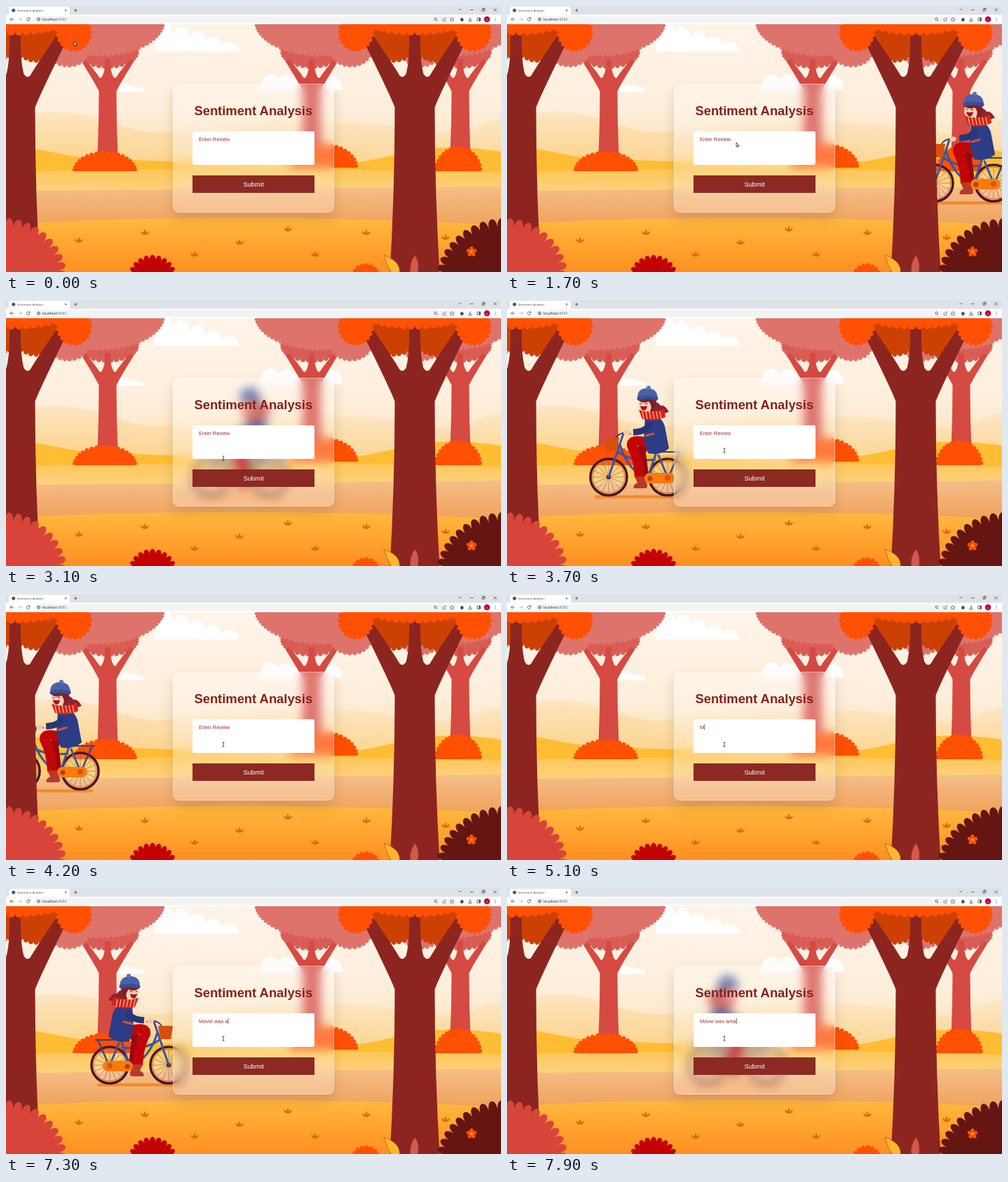
Recreate the animation shown at these times as an HTML page. Size 706 px wide and 380 px high, loop 8000 ms.

```html
<!DOCTYPE html>
<html lang="en">
<head>
<meta charset="utf-8">
<title>Sentiment Analysis</title>
<style>
html, body { margin: 0; width: 100%; height: 100%; overflow: hidden; background: #fff3e8; }
svg, .card { position: absolute; }
svg { left: 0; top: 0; width: 706px; height: 380px; display: block; }
text { font-family: "Liberation Sans", Arial, sans-serif; }
.ui { font-family: "Open Sans", "Noto Sans", sans-serif; }
.card {
  left: 238px; top: 111px; width: 230px; height: 184px; box-sizing: border-box;
  border: 1px solid rgba(255,255,255,.38); border-radius: 9px;
  background: rgba(255,255,255,.24);
  -webkit-backdrop-filter: blur(7px); backdrop-filter: blur(7px);
  box-shadow: 0 9px 18px rgba(125,70,20,.2);
}
#bike, #mouse, #button, #arrow, #hand, #beam { animation: 8s -20ms step-end infinite; }
#bike { animation-name: ride; }
#mouse { animation-name: move; animation-timing-function: linear; }
#button { animation-name: hover; }
#arrow { animation-name: arrow; }
#hand { animation-name: hand; }
#beam { animation-name: beam; }
@keyframes ride {
  0% { transform: translate(900px) scale(1,1); }
  15% { transform: translate(771px) scale(1,1); animation-timing-function: steps(5); }
  21.25% { transform: translate(665px) scale(1,1); animation-timing-function: steps(8); }
  31.25% { transform: translate(495px) scale(1,1); animation-timing-function: steps(12); }
  46.25% { transform: translate(200px) scale(1,1); animation-timing-function: steps(10); }
  58.75% { transform: translate(-46px) scale(1,1); }
  78.75% { transform: translate(-53px) scale(-1,1); animation-timing-function: steps(16); }
  98.75%, 100% { transform: translate(315px) scale(-1,1); }
}
@keyframes move {
  0%, 1.25% { transform: translate(97px,51px); animation-timing-function: steps(6); }
  8.75%, 22.5% { transform: translate(327px,195px); animation-timing-function: steps(5); }
  28.75%, 35% { transform: translate(310px,260px); animation-timing-function: steps(4); }
  40%, 100% { transform: translate(310px,215px); }
}
@keyframes hover { 0% { fill: #8c2923; } 27.5% { fill: #d44b41; } 37.5%, 100% { fill: #8c2923; } }
@keyframes arrow { 0% { opacity: 1; } 27.5%, 100% { opacity: 0; } }
@keyframes hand { 0% { opacity: 0; } 27.5% { opacity: 1; } 37.5%, 100% { opacity: 0; } }
@keyframes beam { 0% { opacity: 0; } 37.5%, 100% { opacity: 1; } }
</style>
</head>
<body>
<svg viewBox="0 0 706 380">
  <defs>
    <linearGradient id="sky" x2="0" y2="1"><stop stop-color="#fff4ea"/><stop offset=".55" stop-color="#feeedb"/><stop offset="1" stop-color="#fcdca6"/></linearGradient>
    <linearGradient id="hill" x2="0" y2="1"><stop stop-color="#fde5c3"/><stop offset="1" stop-color="#fccf7d"/></linearGradient>
    <linearGradient id="band" x2="0" y2="1"><stop stop-color="#ffc75a"/><stop offset="1" stop-color="#fed384"/></linearGradient>
    <linearGradient id="path" x2="0" y2="1"><stop stop-color="#f5be88"/><stop offset="1" stop-color="#ef9f57"/></linearGradient>
    <linearGradient id="grass" x2="0" y2="1"><stop stop-color="#ffb93f"/><stop offset="1" stop-color="#ff8f20"/></linearGradient>
    <g id="wheel"></g>
  </defs>

  <rect y="26" width="706" height="220" fill="url(#sky)"/>
  <g id="clouds" fill="#fff"></g>
  <path fill="url(#hill)" d="M0 164C40 148 90 148 130 160S200 187 240 178V240H0Z"/>
  <path fill="url(#hill)" d="M120 214C250 172 430 152 560 174S660 164 706 162V244H120Z" opacity=".85"/>
  <path fill="#ffbd34" d="M0 202C40 200 70 211 100 215S240 222 400 228S560 186 706 208V250H0Z"/>
  <path fill="url(#band)" d="M0 237Q353 229 706 238V270H0Z"/>
  <path fill="url(#path)" d="M0 264Q353 262 706 258V320H0Z"/>
  <path fill="url(#grass)" d="M0 313C150 300 500 300 706 313V380H0Z"/>
  <g id="back"></g>

  <!-- cyclist, hat at x = 0 -->
  <g id="bike" stroke-linecap="round" stroke-linejoin="round">
    <rect x="-75" y="279" width="122" height="4.500" rx="2" fill="#f28b2c"/>
    <use href="#wheel" x="-55" y="253"/><use href="#wheel" x="29" y="253"/>
    <path d="M12 208Q22 204 31 210Q29 216 12 215Z" fill="#4b1a2a"/>
    <g fill="none" stroke="#3a55a0" stroke-width="3">
      <path d="M-34 191L-55 253M-39 206Q-28 244 0 255L13 218M-43 216Q-23 232 11 228M16 222L29 253H0"/>
      <path d="M11 217H49M46 217L31 252M-45 197Q-38 187 -24 191" stroke="#33427f" stroke-width="2"/>
    </g>
    <path d="M-61 197H-40L-43 216H-58Z" fill="#d9500e"/>
    <path d="M5 204Q-12 212 -8 222L-4 254" fill="none" stroke="#98080f" stroke-width="13" stroke-linecap="butt"/>
    <path d="M8 206Q-24 196 -22 208Q-12 226 -11 254" fill="none" stroke="#c20507" stroke-width="14" stroke-linecap="butt"/>
    <path d="M-18 252H-4L0 264Q1 269 -4 269H-19Q-21 264 -14 261Z" fill="#b8382c"/>
    <rect x="-4" y="247" width="43" height="15" rx="7.500" fill="#fb7a0c"/>
    <circle cx="29" cy="254" r="4" fill="#d9560d"/><circle cx="4" cy="255" r="3.500" fill="#b83f10"/>
    <path d="M5 147Q14 143 19 151Q25 149 31 160Q25 160 23 166Q14 163 4 159Z" fill="#8b2431"/>
    <path d="M-3 167Q18 160 25 180L31 212Q18 223 1 219L-5 199Z" fill="#2c3d85"/>
    <path d="M4 176Q0 188 -20 189" fill="none" stroke="#263677" stroke-width="9" stroke-linecap="butt"/>
    <path d="M-2 194L9 191" stroke="#d5522f" stroke-width="3"/>
    <ellipse cx="-29" cy="190" rx="5" ry="3.500" fill="#f9c3a5"/>
    <ellipse cx="-3" cy="150" rx="10" ry="11" fill="#fdd2b8"/>
    <path d="M-13 143Q0 137 13 143Q13 154 5 159Q7 149 2 145Q-6 149 -13 143Z" fill="#7d2029"/>
    <path d="M-10 151Q-5 153 0 151Q-1 158 -5 158Q-9 157 -10 151Z" fill="#a5121c"/>
    <path d="M-10 148H-8M-3 148H0" stroke="#48151c" stroke-width="1.200"/>
    <path d="M-14 140Q-14 126 0 126T15 140Q1 136 -14 140Z" fill="#4a62a8"/>
    <circle cx="2" cy="125.500" r="3" fill="#5872b4"/>
    <path d="M-12 141Q0 137 13 141" fill="none" stroke="#394f96" stroke-width="5"/>
    <path d="M-12 157Q5 163 24 155L26 167Q11 175 -7 170Z" fill="#d8211b"/>
    <g id="stripes" stroke="#ffd08a" stroke-width="1.200"></g>
  </g>

  <g id="front"></g>

  <!-- browser bar -->
  <rect width="706" height="13" fill="#dee1e6"/>
  <rect x="4" y="1" width="87" height="14" rx="3" fill="#fff"/>
  <rect y="12.500" width="706" height="13.500" fill="#fff"/>
  <rect x="40" y="14.500" width="603" height="9.500" rx="4.750" fill="#f1f3f4"/>
  <circle cx="10.700" cy="6.200" r="2.500" fill="#54585c"/>
  <text class="ui" x="16" y="7.800" font-size="4.250" fill="#3c4043">Sentiment Analysis</text>
  <text class="ui" x="52" y="21" font-size="5.100" fill="#202124">localhost<tspan fill="#70757a">:8080</tspan></text>
  <g fill="none" stroke="#45494d" stroke-width=".8">
    <path d="M84 5l2.500 2.500m0-2.500l-2.500 2.500M97 6.200h4.500M99.250 4v4.500"/>
    <path d="M645.500 4l1.800 1.800l1.800-1.800M662 5.500h4.500M679 4.300h3v3h-3zM680 3.300h3v3M695.700 3.500l4 4m0-4l-4 4"/>
    <path d="M11 19H6m2.300-2.300L6 19l2.300 2.300M33.500 17.600a2.300 2.300 0 1 0 .5 1.900M34 16.300v1.900h-2"/>
    <path d="M17.500 19h5m-2.300-2.300l2.300 2.300l-2.300 2.300" stroke="#a9acb0"/>
    <circle cx="46.500" cy="19" r="2"/><path d="M46.500 17.800v2.400"/>
    <circle cx="612.500" cy="18.700" r="1.700"/><path d="M613.800 20l1.500 1.500"/>
    <path d="M623 18v3.300h4V20m-2.500-.5q.5-2 2.500-2m-1-1.200l1.400 1.200l-1.400 1.200" stroke-width=".6"/>
    <path d="M636 16.400l1 2l2 .2l-1.500 1.300l.4 1.900l-1.900-1l-1.900 1l.4-1.900l-1.500-1.300l2-.2z" stroke-width=".6"/>
    <path d="M662 16.300v3.800m-1.700-1.600l1.700 1.700l1.700-1.700m-3.900 1.800v1.400h4.400v-1.400M672 17h4.500v4.200h-4.500z"/>
    <path d="M698 17v4.500" stroke-width="1.200" stroke-linecap="round" stroke-dasharray="0 2"/>
  </g>
  <path d="M648.300 17.500h1.200q.6-1.800 1.400 0h1.300v1.200q1.600.6 0 1.500v1.500h-3.900zM674.500 17h2v4.200h-2z" fill="#45494d"/>
  <circle cx="686" cy="19" r="4.300" fill="#c2063c"/>
  <text class="ui" x="686" y="20.600" font-size="4" fill="#fff" text-anchor="middle">v</text>
</svg>

<div class="card"></div>

<svg viewBox="0 0 706 380">
  <text x="352.800" y="156" font-size="18.380" font-weight="700" fill="#85211b" text-anchor="middle">Sentiment Analysis</text>
  <rect x="266" y="179" width="174" height="48" rx="2.500" fill="#fff"/>
  <path d="M436 226l3-3m-1 3l1-1" stroke="#999" stroke-width=".5"/>
  <text id="entry" x="275" y="192.600" font-size="7.450" fill="#9a302a" xml:space="preserve">Enter Review</text>
  <rect id="caret" y="186" width=".7" height="8" fill="#6b1d19"/>
  <rect id="button" x="266" y="242" width="174" height="25" fill="#8c2923"/>
  <text x="353" y="257.900" font-size="9.400" fill="#fff" text-anchor="middle">Submit</text>
  <g id="mouse" stroke="#111" stroke-width=".7" fill="#fff" stroke-linejoin="round">
    <path id="arrow" d="M0 0v5.800l1.400-1.200l.9 2.100l.9-.4l-.9-2H4z"/>
    <path id="hand" d="M0 .6q.7-.8 1.300 0V3l2.500.6q.6.400.4 1.400l-.7 2H.8l-2.200-2.600q.2-1 1.400-.2z"/>
    <path id="beam" d="M-1.500-3h3M0-3v6M-1.500 3h3"/>
  </g>
</svg>

<script>
const $ = id => document.getElementById(id);
const repeat = (n, f) => Array.from({ length: n }, (_, i) => f(i)).join('');
const PINK = '#de736b', ROSE = '#d85d55', ORANGE = '#ff5003', RUST = '#cc4103';

// Ellipse edged with leaves, or only its upper half: "size" is a leaf's width, "bulge" its length.
function leafy(fill, cx, cy, rx, ry, { size = 6, bulge = .75, half = false } = {}) {
  const turn = half ? Math.PI : 2 * Math.PI;
  const n = Math.round(turn * (rx + ry) / 2 / size);
  const at = i => {
    const a = Math.PI + turn * i / n;
    return [cx + rx * Math.cos(a), cy + ry * Math.sin(a)];
  };
  const leaves = repeat(n, i => {
    const [x, y] = at(i), [ex, ey] = at(i + 1);
    const ox = (ey - y) * bulge, oy = (x - ex) * bulge;
    return `C${x + ox} ${y + oy} ${ex + ox} ${ey + oy} ${ex} ${ey}`;
  });
  return `<path fill="${fill}" d="M${at(0)}${leaves}Z"/>`;
}

const place = (x, content, flip = 1) => `<g transform="translate(${x}) scale(${flip},1)">${content}</g>`;
const mirror = content => place(0, content) + place(0, content, -1);

// Half a forked trunk, mirrored about its axis.
const trunk = ({ fill, foot, bottom, neck, neckY, reach, tip, thick, notch, notchY, stub }) => mirror(
  `<path fill="${fill}" d="M-.5 ${bottom}H${foot}Q${neck} ${(neckY + bottom) / 2} ${neck} ${neckY}
  Q${neck + thick / 3} ${neckY - thick} ${reach} ${tip}L${reach - thick} ${tip - thick / 3}
  Q${notch + thick} ${notchY - thick * 1.5} ${notch + thick / 3} ${notchY - thick / 3}
  Q${notch} ${notchY} ${notch - thick / 3} ${notchY - thick / 2}
  Q${stub - 1} ${notchY - thick * 2} ${stub} ${tip - thick / 3}H-.5Z"/>`);

const backTree = (x, flip) => place(x,
  leafy(ROSE, 0, 66, 43, 19) +
  trunk({ fill: '#d54a42', foot: 14.5, bottom: 213, neck: 12.5, neckY: 122, reach: 38, tip: 78, thick: 6, notch: 10, notchY: 104, stub: 4 }) +
  leafy(PINK, -12, 22, 92, 46) + leafy(PINK, -56, 64, 28, 20), flip);

const frontTree = x => place(x,
  mirror(leafy(RUST, 30, 50, 31, 27, { size: 7 })) +
  trunk({ fill: '#8c2520', foot: 36, bottom: 390, neck: 28.5, neckY: 145, reach: 78, tip: 40, thick: 14, notch: 17, notchY: 104, stub: 8 }) +
  leafy(ORANGE, 0, 14, 84, 22, { size: 7 }) + mirror(leafy(ORANGE, 84, 38, 22, 24, { size: 7 })));

// A row of domes on a flat base, from height "h" to "end" of that height.
const cloud = (x, base, w, h, end) => `<rect x="${x}" y="${base - 6}" width="${w}" height="6" rx="3"/>` +
  repeat(5, i => {
    const r = w / 8, tall = h * (1 + (end - 1) * i / 4);
    return `<path d="M${x + (w - 2 * r) * i / 4} ${base}a${r} ${tall} 0 0 1 ${2 * r} 0z"/>`;
  });

const tufts = [[104, 334], [198, 323], [269, 354], [333, 337], [402, 318], [441, 354], [514, 323], [627, 330]];
const tuft = ([x, y]) => `<path transform="translate(${x} ${y})" fill="#dc6a04" d="M-6-1q1 5 6 5t6-5q-3 0-4.500 2.500Q2-2 0-4Q-2-2-1.500 1.500Q-3-1-6-1z"/>`;
const blade = (x, fill, lean) => `<path fill="${fill}" stroke="#8c2520" stroke-width=".5" d="M${x} 356q${8 + lean} 9 ${4 + lean} 28h-10q${-3 - lean / 3}-15 ${6 - lean}-28z"/>`;

$('clouds').innerHTML = cloud(212, 65, 120, 44, .3) + cloud(160, 123, 37, 14, .5) + cloud(362, 120, 118, 22, .9);
$('wheel').innerHTML = `<circle r="26" fill="#fff" fill-opacity=".12" stroke="#4a1826" stroke-width="3.600"/>
  <circle r="22.800" fill="none" stroke="#c9683f"/>` +
  repeat(16, i => `<path d="M0 0V22" stroke="#6d3b40" stroke-width=".45" transform="rotate(${i * 22.5})"/>`) +
  '<circle r="3" fill="#4a1826"/>';
$('stripes').innerHTML = repeat(6, i => `<path d="M${i * 5 - 7} 159.500l2 10"/>`);

const dome = { half: true }, bush = { size: 12, bulge: 1.3 };
$('back').innerHTML = backTree(145) + backTree(436, -1) + backTree(648) +
  leafy(ORANGE, 141, 236, 44, 25, dome) + leafy(ORANGE, 453, 231, 47, 31, dome) + leafy(ORANGE, 645, 236, 31, 33, dome);

$('front').innerHTML = tufts.map(tuft).join('') + frontTree(13) + frontTree(583) +
  leafy('#d84439', -2, 390, 78, 75, bush) + leafy('#c40205', 209, 388, 29, 26, { size: 8, bulge: 1.1 }) +
  leafy(ORANGE, 513, 386, 18, 15) + leafy('#651512', 714, 392, 90, 77, bush) +
  blade(539, '#ffb62c', 18) + blade(583, '#d4584b', 0) +
  `<g transform="translate(664 351)" fill="${ORANGE}">` +
  repeat(5, i => `<ellipse cy="-4.200" rx="2.700" ry="3.300" transform="rotate(${i * 72})"/>`) +
  '<circle r="1.800" fill="#ffc23a"/></g>';

// Typing follows the clock of the ride; it slows after the second word.
const review = 'Movie was ama';
const keyTime = i => i < 9 ? 5100 + 200 * i : 7000 + 250 * (i - 9);
const clock = $('bike').getAnimations()[0];
const entry = $('entry'), caret = $('caret');
function type() {
  const t = ((clock.currentTime || 0) + 20) % 8000;
  const typed = [...review].filter((c, i) => t >= keyTime(i)).join('');
  entry.textContent = typed || 'Enter Review';
  caret.setAttribute('x', 275.3 + (typed ? entry.getComputedTextLength() : 0));
  caret.style.opacity = t >= 4900 ? 1 : 0;
  requestAnimationFrame(type);
}
type();
</script>
</body>
</html>
```
